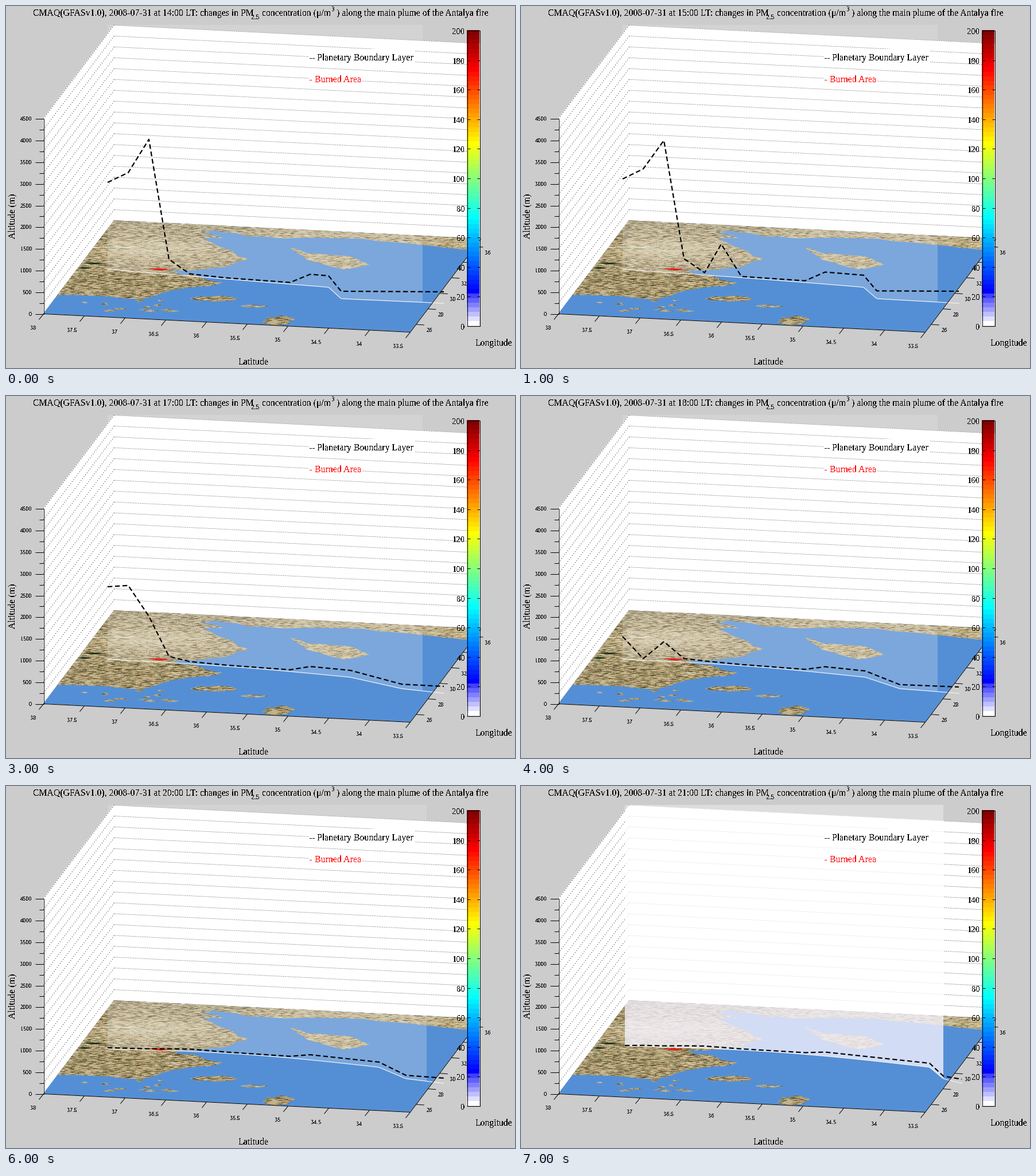
Recreate the animation shown at these times as a matplotlib script. Size 887 by 632 pixels, loop 8 s.

```python
import numpy as np
import matplotlib
import matplotlib.pyplot as plt
from matplotlib.animation import FuncAnimation
from matplotlib.patches import Polygon, Rectangle
from matplotlib.path import Path

W, H, DPI = 887, 632, 64
PX = 72 / DPI  # points per pixel

matplotlib.rcParams["font.family"] = "Liberation Serif"
matplotlib.rcParams["toolbar"] = "None"

fig = plt.figure(figsize=(W / DPI, H / DPI), dpi=DPI, facecolor="#cccccc")
ax = fig.add_axes([0, 0, 1, 1])
ax.set_xlim(0, W)
ax.set_ylim(H, 0)
ax.axis("off")
rng = np.random.RandomState(7)

# Corners of the box on the stage
FRONT_L, FRONT_R = np.array([65, 537]), np.array([704, 569])
BACK_L, BACK_R = np.array([188, 374]), np.array([827, 406])
UP = np.array([0, -341])


def poly(points, color, z, **kw):
    return ax.add_patch(Polygon(points, closed=True, fc=color, ec="none", zorder=z, **kw))


def line(p, q, color="black", width=1, z=6, **kw):
    """Thin line through pixel centres."""
    return ax.plot([p[0] + .5, q[0] + .5], [p[1] + .5, q[1] + .5], color=color,
                   lw=width * PX, zorder=z, solid_capstyle="butt", **kw)[0]


def text(x, y, s, size, ha="left", va="baseline", color="black", z=9, **kw):
    return ax.text(x, y, s, fontsize=size * PX, ha=ha, va=va, color=color,
                   zorder=z, antialiased=False, **kw)


# ---- walls and their dotted grid ----
def draw_walls():
    poly([FRONT_L, BACK_L, BACK_L + UP, FRONT_L + UP], "white", 1)
    poly([BACK_L, BACK_R, BACK_R + UP, BACK_L + UP], "white", 1)
    for k in range(19):
        rise = UP * k / 18
        line(BACK_L + rise, BACK_R + rise, width=.8, z=2, linestyle=(0, (1.2, 2.6)))
        line(FRONT_L + rise, BACK_L + rise, width=.9, z=2, linestyle=(0, (1.2, 3.6)))
    for y, w in [(75, 185), (114, 93)]:
        ax.add_patch(Rectangle((527, y), w, 28, fc="white", ec="none", zorder=2.5))


# ---- floor map ----
def rough(points, amount, rounds=3):
    """Break straight coast into a jagged one by shifting midpoints."""
    pts = np.array(points, float)
    for _ in range(rounds):
        mids = (pts[:-1] + pts[1:]) / 2
        mids += rng.uniform(-1, 1, mids.shape) * amount * [1.6, .8]
        joined = np.empty((2 * len(pts) - 1, 2))
        joined[::2], joined[1::2] = pts, mids
        pts, amount = joined, amount / 2
    return pts


def blob(x, y, w, h):
    a = np.linspace(0, 2 * np.pi, 9)
    return rough(np.column_stack([x + w / 2 * np.cos(a), y + h / 2 * np.sin(a)]), h / 5, 2)


def land_shapes():
    coast = rough([(812, 426), (685, 413), (560, 405), (420, 402), (360, 391),
                   (335, 396), (378, 405), (343, 408), (385, 424), (422, 441),
                   (385, 455), (290, 462), (325, 469), (377, 483), (335, 490),
                   (236, 512), (89, 505)], 3.5)
    mainland = np.vstack([[BACK_L, BACK_R], coast])
    cyprus = rough([(495, 422), (530, 432), (600, 437), (633, 452), (590, 460),
                    (560, 453), (525, 443), (495, 422)], 2)
    shapes = [mainland, cyprus, blob(362, 511, 84, 10), blob(432, 524, 50, 4),
              blob(475, 549, 54, 16)]
    for _ in range(12):
        shapes.append(blob(rng.uniform(115, 290), rng.uniform(511, 533),
                           rng.uniform(10, 30), rng.uniform(2, 4)))
    return shapes


def terrain(rows=196, cols=764):
    """Streaky relief colours for the land."""
    noise = rng.rand(rows, cols)
    noise = sum(np.roll(noise, k, axis=1) for k in range(7)) / 7
    noise = .5 + (noise - .5) * 1.7
    y, x = np.mgrid[373:373 + rows, 64:64 + cols]
    plateau = np.exp(-((x - 250) / 120) ** 2 - ((y - 423) / 19) ** 2)
    east = np.clip((x - 400) / 100, 0, 1) * (y < 470)
    noise += .25 * plateau + .13 * east
    level = [0, .25, .38, .5, .62, .75, 1]
    tones = np.array([(58, 66, 38), (126, 88, 56), (122, 134, 92), (180, 150, 106),
                      (190, 178, 142), (208, 186, 140), (210, 211, 190)]) / 255
    rgb = np.stack([np.interp(noise, level, tones[:, c]) for c in range(3)], axis=-1)
    return rgb, (64, 64 + cols, 373 + rows, 373)


def draw_floor():
    poly([FRONT_L, BACK_L, BACK_R, FRONT_R], "#548fd6", 3)
    rgb, extent = terrain()
    img = ax.imshow(rgb, extent=extent, aspect="auto", interpolation="nearest", zorder=3.2)
    ax.set_xlim(0, W)
    ax.set_ylim(H, 0)
    land = Path.make_compound_path(*[Path(np.vstack([s, s[:1]]), closed=True)
                                     for s in land_shapes()])
    img.set_clip_path(land, ax.transData)
    for x, y, w in [(134, 449, 40), (124, 457, 26)]:
        poly([(x, y), (x + w * .6, y - 1), (x + w, y + 1), (x + w * .5, y + 2)], "#10301c", 3.4)
    for x, y, w in [(150, 421, 75), (272, 448, 26)]:
        line((x, y), (x + w, y - 1), "#f2efdc", 1, 3.4)
    poly([(248, 459), (262, 458), (287, 460), (270, 462)], "#f01810", 4.6)


# ---- axes ----
def draw_axes():
    line(FRONT_L, FRONT_L + UP)
    line(FRONT_L, FRONT_R)
    line(FRONT_R, BACK_R)
    for k in range(19):
        y = round(537 - 341 * k / 18)
        line((50 if k % 2 == 0 else 57, y), (65, y))
        if k % 2 == 0:
            text(45, y + 4, str(250 * k), 10.3, ha="right")
    for k in range(10):
        x, y = FRONT_L + (FRONT_R - FRONT_L) * k / 9
        line((x, y), (x - 8, y + 10))
        text(53 + 71 * k, 565 + 3.56 * k, f"{38 - k / 2:g}", 10.3, ha="right")
    for lon in range(26, 37, 2):
        x, y = FRONT_R + (BACK_R - FRONT_R) * (lon - 25) / 12
        line((x, y), (x + 14, y + 1))
        text(x + 18, y + 14, str(lon), 10.3, z=6)
    text(431.5, 626, "Latitude", 16, ha="center")
    text(850, 593, "Longitude", 15.7, ha="center")
    text(11, 367, "Altitude (m)", 15.7, ha="center", va="center", rotation=90)
    for y, dash, x, label, color in [(95, "--", 542, "Planetary Boundary Layer", "black"),
                                     (133, "-", 538, "Burned Area", "red")]:
        text(528, y, dash, 15.9, color=color)
        text(x, y, label, 15.9, color=color)


def jet(i):
    v = (i + 1) / 16
    return [float(np.clip(1.5 - abs(v - c), 0, 1)) for c in (3, 2, 1)]


def draw_colorbar():
    x0, x1, top, bottom = 803, 825, 42, 558
    step = (bottom - top) / 64
    for i in range(64):
        fade = 1 - i * .125
        color = (fade, fade, 1) if i < 7 else jet(i)
        ax.add_patch(Rectangle((x0, bottom - (i + 1) * step), x1 - x0, step + .3, fc=color,
                               ec="none", zorder=7, antialiased=False))
    ax.add_patch(Rectangle((x0 + .5, top + .5), x1 - x0, bottom - top, fc="none",
                           ec="black", lw=PX, zorder=8))
    for k in range(11):
        y = round(bottom - (bottom - top) * k / 10)
        line((x0, y), (x0 + 5, y), z=8)
        line((x1 - 5, y), (x1, y), z=8)
        text(800, y + 7, str(20 * k), 14.8, ha="right")


# ---- plume track and boundary layer, in stage pixels by hour ----
HOURS = [14, 15, 17, 18, 20, 21]
SHAPE = {
    "start": [460, 460, 460, 460, 459, 454],   # y of the inland end
    "bend": [562, 597, 600, 600, 650, 712],    # x where the track turns away
    "span": [22, 23, 90, 60, 47, 24],          # width of that turn
    "sea": [20, 21, 12, 11, 9, 7],             # layer height over water
    "north": [152, 158, 127, 40, 2, 1],        # layer heights over land
    "inland": [172, 178, 131, 3, 2, 2],
    "peak": [233, 230, 79, 34, 2, 2],
    "ridge": [0, 53, 0, 0, 0, 0],              # bump just off the coast
}


def profile(h):
    """Track and layer outlines; hours in between are interpolated."""
    s = {name: np.interp(h, HOURS, v) for name, v in SHAPE.items()}
    left, right = (181, 768) if h == 21 else (177, 763)
    bend, turn = s["bend"], s["bend"] + s["span"]

    def track_y(x):
        y = np.interp(x, [left, bend, turn, right], [s["start"], 491, 511, 519])
        t = np.clip((x - left) / (bend - left), 0, 1)
        return y - 1.1 * (h - 14) * np.sin(np.pi * t)

    xs = np.linspace(left, right, 200)
    keys = np.array([left, 213, 249, 284, 320, 349, 384, 495, 530, bend, turn, right])
    sea = s["sea"]
    rise = np.array([s["north"], s["inland"], s["peak"], 3 + s["peak"] * .1, 4,
                     3 + s["ridge"], 2, 3, sea, sea, .65 * sea, sea])
    return (xs, track_y(xs)), (keys, track_y(keys) - rise)


draw_walls()
draw_floor()
draw_axes()
draw_colorbar()

# ---- moving parts ----
blank = [(0, 0), (1, 0), (1, 1)]
strip = poly(blank, "#d3d3d3", .5)
wall_veil = poly(blank, "white", 4)
floor_veil = poly(blank, "white", 4)
track_line, = ax.plot([], [], color="#f4f4f4", lw=1.2 * PX, zorder=4.5)
layer_line, = ax.plot([], [], color="black", lw=2.2 * PX, zorder=5,
                      linestyle=(0, (3.8, 2.1)), dash_capstyle="butt")
TITLE = 15.7
clock = text(47, 17, "", TITLE)
text(428, 23, "2.5", 11.5)
text(446, 17, "concentration (\u03bc/m", TITLE)
text(567, 9, "3", 11.5)
text(841, 17, ") along the main plume of the Antalya fire", TITLE, ha="right")


def update(i):
    h = 14 + i
    track, layer = profile(h)
    dense = h == 21
    left, top = track[0][0], BACK_L[1] + UP[1]
    right = np.interp(h, [18, 20, 21], [726, 733, 736])

    xs = np.linspace(left, right, 200)
    foot = np.column_stack([xs, np.interp(xs, *track)])
    # floor rim: slanted left edge up to the corner, then the back edge
    rim_y = np.interp(xs, [FRONT_L[0], BACK_L[0], BACK_R[0]],
                      [FRONT_L[1], BACK_L[1], BACK_R[1]])
    rim = np.column_stack([xs, rim_y])
    crest = rim + UP

    strip.set_xy([(left, top), (right, top), *crest[::-1]])
    strip.set_facecolor("#dddddd" if dense else "#d3d3d3")
    wall_veil.set_xy(np.vstack([crest, rim[::-1]]))
    wall_veil.set_alpha(.78 if dense else .08)
    floor_veil.set_xy(np.vstack([rim, foot[::-1]]))
    floor_veil.set_facecolor("#f6f3ff" if dense else "#f0f0f0")
    floor_veil.set_alpha(.78 if dense else .25)

    track_line.set_data(*track)
    layer_line.set_data(*layer)
    clock.set_text(f"CMAQ(GFASv1.0), 2008-07-31 at {h}:00 LT: changes in PM")
    return strip, wall_veil, floor_veil, track_line, layer_line, clock


update(0)
anim = FuncAnimation(fig, update, frames=8, interval=1000, repeat=True,
                     repeat_delay=0, blit=False)
plt.show()
```
